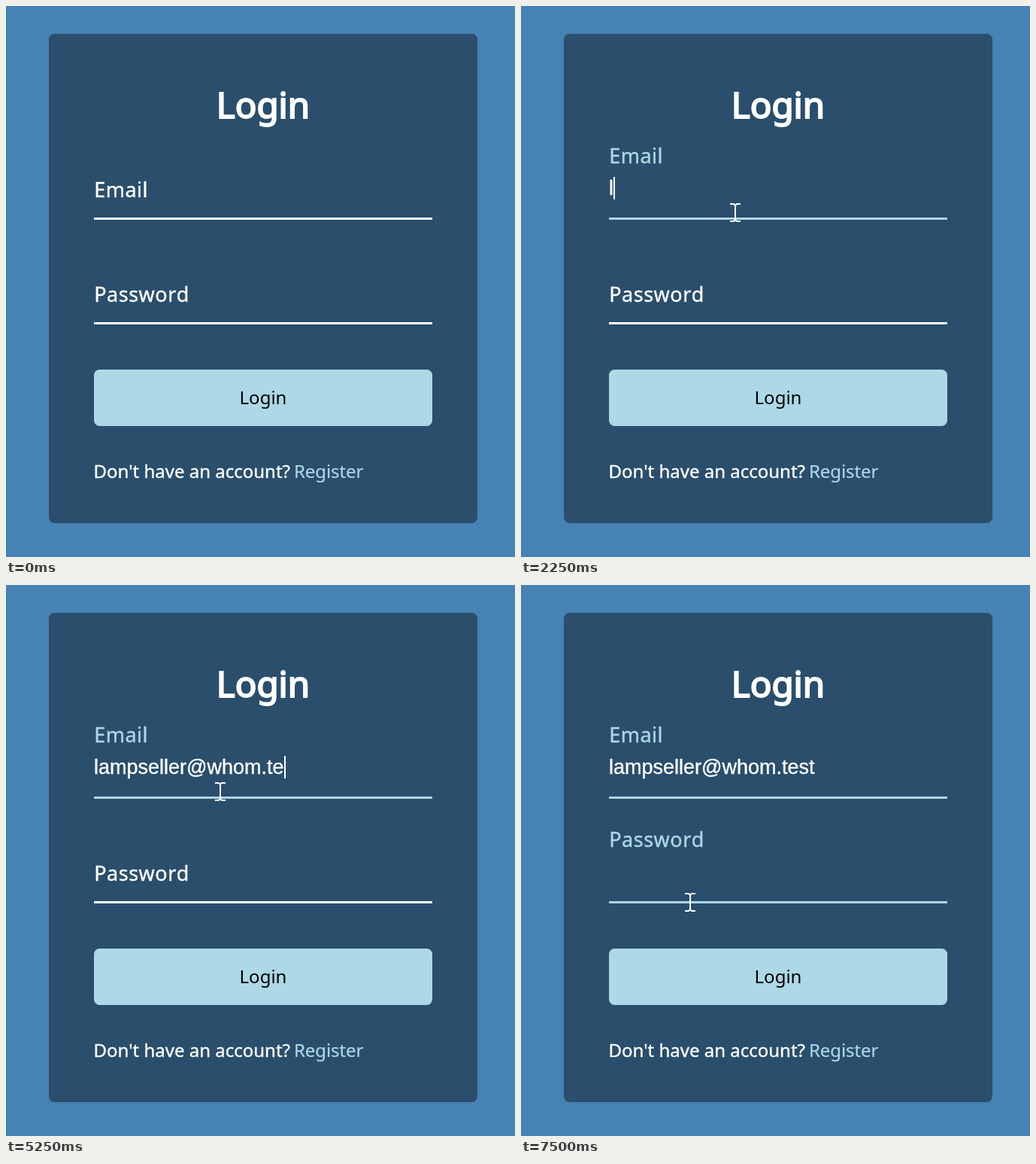
An HTML page that plays this animation: 677x732 px, repeating every 8 s.

```html
<!DOCTYPE html>
<html lang="en">
<head>
<meta charset="utf-8">
<title>Login form</title>
<style>
  html, body { margin: 0; width: 100%; height: 100%; overflow: hidden; background: #4682b4; }
  svg { display: block; width: 100%; height: 100%; }
  text { font-family: "Noto Sans", sans-serif; color: #fff; white-space: pre; }
  text, tspan { fill: currentColor; stroke: currentColor; stroke-width: .4px; }
  .title { font-size: 47.5px; stroke-width: 2px; }
  .label { font-size: 27px; letter-spacing: .5px; }
  .value { font: 27px "Liberation Sans", Arial, sans-serif; }
  .small { font-size: 24px; }
  .button { color: #000; stroke: none; }
  .link { color: #add8e6; stroke-width: .2px; }
</style>
</head>
<body>
<svg viewBox="0 0 677 732">
  <rect width="677" height="732" fill="#4682b4"/>
  <rect x="57" y="37" width="570" height="650" rx="7.5" fill="#2a4e6c"/>
  <text class="title" x="342" y="149" text-anchor="middle">Login</text>

  <rect id="emailLine" x="117" y="281" width="450" height="3"/>
  <rect id="passLine" x="117" y="420" width="450" height="3"/>
  <text id="emailLabel" class="label" x="117.2" y="254"></text>
  <text id="passLabel" class="label" x="117.2" y="393"></text>
  <text id="value" class="value" x="117" y="251"></text>
  <rect id="caret" width="2" height="30" fill="#fff"/>

  <rect x="117" y="483" width="450" height="75" rx="7.5" fill="#add8e6"/>
  <text class="small button" x="342" y="529" text-anchor="middle">Login</text>
  <text class="small" x="116.5" y="627">Don't have an account?</text>
  <text class="small link" x="383" y="627" letter-spacing="-.1">Register</text>

  <path id="arrow" d="M0 0V17L4 13.200L6.600 19L9 18L6.500 12.300H12Z" fill="#fff" stroke="#000"/>
  <path id="beam" d="M-7-11.500H-2L0-9.500L2-11.500H7M-7 11.500H-2L0 9.500L2 11.500H7M0-10V10" fill="none" stroke="#fff" stroke-width="2"/>
</svg>
<script>
const LOOP = 8000, STEP = 250;
const EMAIL_FOCUS = 1440, PASS_FOCUS = 6770;
const ADDRESS = 'lampseller@whom.test';
const WHITE = [255, 255, 255], LIGHT = [173, 216, 230];

// [time, characters typed]
const KEYS = [
  [2250, 1], [2500, 3], [2750, 5], [3000, 7], [3250, 8], [3500, 10], [4000, 11],
  [4250, 12], [4500, 14], [4750, 15], [5000, 16], [5250, 18], [5500, 20]
];
// [time, x, y]
const POINTER = [
  [750, 588, 300], [1000, 450, 288], [1250, 315, 276], [1500, 285, 274.5],
  [5750, 285, 274.5], [6000, 272, 318], [6250, 250, 382], [6500, 231, 412], [6750, 225, 421.5]
];

const $ = id => document.getElementById(id);
const show = (el, on) => el.setAttribute('visibility', on ? 'visible' : 'hidden');
const lastBefore = (list, t) => list.filter(k => k[0] <= t).pop();

const bez = (a, b, u) => 3 * a * u * (1 - u) ** 2 + 3 * b * u * u * (1 - u) + u ** 3;

function easeInOutBack(x) {
  if (x <= 0) return 0;
  if (x >= 1) return 1;
  let lo = 0, hi = 1;
  for (let i = 0; i < 30; i++) {
    const mid = (lo + hi) / 2;
    if (bez(0.68, 0.265, mid) < x) lo = mid; else hi = mid;
  }
  return bez(-0.55, 1.55, lo);
}

function tint(p) {
  const k = Math.min(1, Math.max(0, p));
  return `rgb(${WHITE.map((c, i) => Math.round(c + (LIGHT[i] - c) * k))})`;
}

function makeLabel(id, word, base) {
  const letters = [...word].map(ch => {
    const span = document.createElementNS('http://www.w3.org/2000/svg', 'tspan');
    span.textContent = ch;
    $(id).append(span);
    return span;
  });
  return elapsed => letters.forEach((span, i) => {
    const p = easeInOutBack((elapsed - i * 50) / 300);
    span.setAttribute('y', base - 45 * p);
    span.style.color = tint(p);
  });
}

const liftEmail = makeLabel('emailLabel', 'Email', 254);
const liftPass = makeLabel('passLabel', 'Password', 393);

function drawCaret(t, lastKey) {
  const inPass = t >= PASS_FOCUS;
  const since = inPass ? PASS_FOCUS : lastKey;
  const textWidth = inPass || !$('value').textContent ? 0 : $('value').getComputedTextLength();
  $('caret').setAttribute('x', 117 + Math.round(textWidth));
  $('caret').setAttribute('y', inPass ? 367 : t < 2000 ? 228 : 227);
  show($('caret'), t >= EMAIL_FOCUS && (t - since) % 1000 < 500);
}

function drawPointer(t) {
  const at = lastBefore(POINTER, t);
  const overField = at && at[1] < 567;
  show($('arrow'), at && !overField);
  show($('beam'), overField);
  if (at) $(overField ? 'beam' : 'arrow').setAttribute('transform', `translate(${at[1]} ${at[2]})`);
}

function render(time) {
  const t = Math.floor((time % LOOP) / STEP) * STEP;
  const [lastKey, count] = lastBefore(KEYS, t) || [EMAIL_FOCUS, 0];
  liftEmail(t - EMAIL_FOCUS);
  liftPass(t - PASS_FOCUS);
  $('emailLine').setAttribute('fill', tint(t >= EMAIL_FOCUS ? 1 : 0));
  $('passLine').setAttribute('fill', tint(t >= PASS_FOCUS ? 1 : 0));
  $('value').textContent = ADDRESS.slice(0, count);
  drawCaret(t, lastKey);
  drawPointer(t);
}

const start = performance.now();
function tick() {
  render(performance.now() - start);
  requestAnimationFrame(tick);
}
tick();
</script>
</body>
</html>
```
